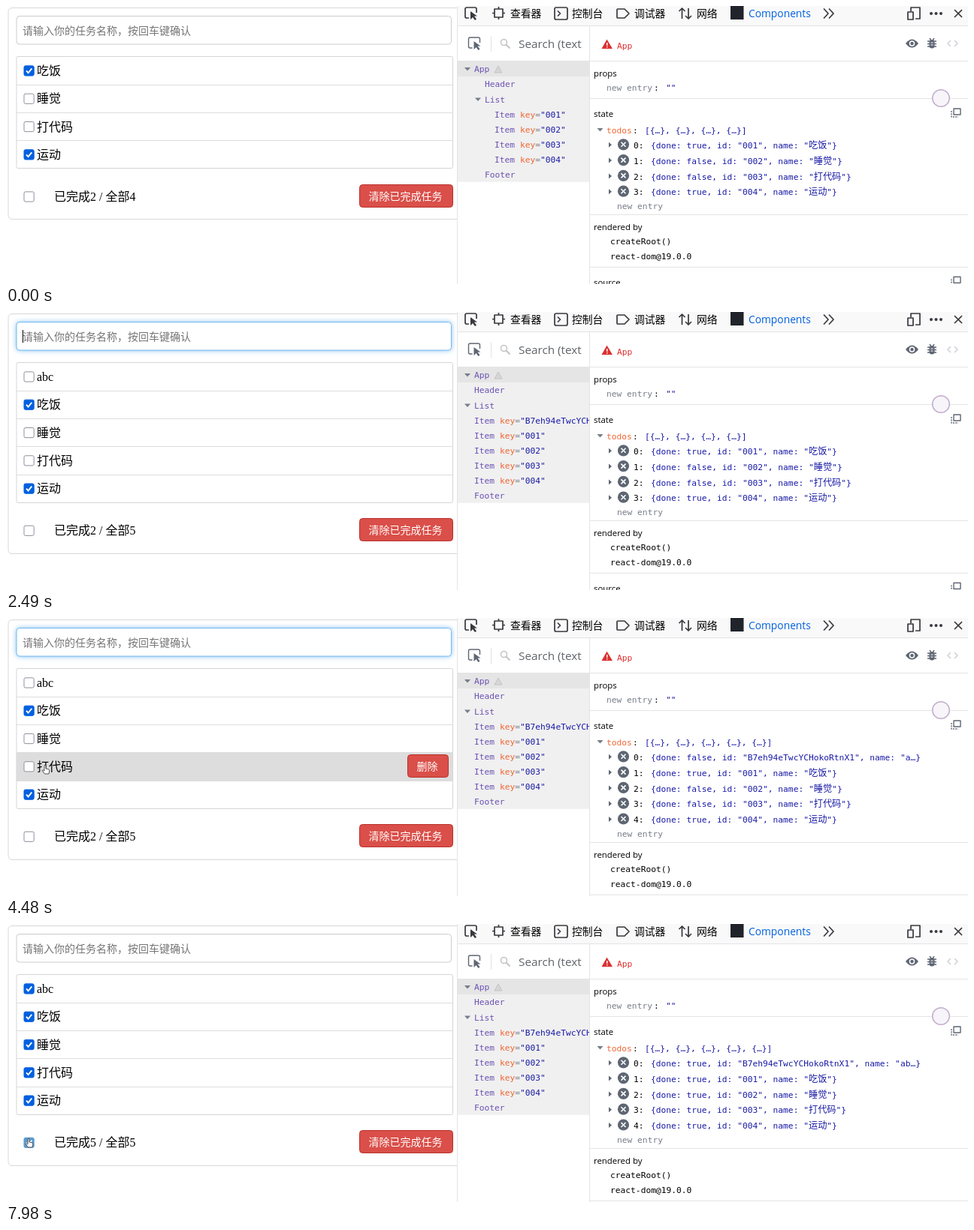
An HTML page for the animation above (8 s loop, 1280 by 371 pixels).

```html
<!DOCTYPE html>
<html lang="zh">
<head>
<meta charset="utf-8">
<style>
html, body { margin: 0; width: 100%; height: 100%; overflow: hidden; background: #fff; }
svg { display: block; width: 1280px; height: 371px; }
text { white-space: pre; }
.page { font: 300 16px "Liberation Serif", "Noto Sans CJK SC", serif; }
.field { font: 14px "Noto Sans", "Noto Sans CJK SC", sans-serif; }
.tab { font: 13.8px "Open Sans", "Noto Sans CJK SC", sans-serif; }
.search { font: 15.3px "Open Sans", sans-serif; fill: #5f6368; }
.label { font: 11.4px "Open Sans", sans-serif; }
.mono { font: 11.25px "DejaVu Sans Mono", "Noto Sans CJK SC", monospace; }
.cjk { font-size: 12.2px; font-weight: 300; }
.name { fill: #6a51b2; }
.attr { fill: #ef6632; }
.value { fill: #1a1aa6; }
.dim { fill: #777d88; }
.icon { fill: none; stroke: #38383d; stroke-width: 1.7; stroke-linejoin: round; }
.grey { stroke: #5f6673; stroke-width: 1.4; }
.rule { fill: none; stroke: #e4e4e6; }
.focus { filter: drop-shadow(0 0 3px rgba(82,168,236,.7)); }
</style>
</head>
<body>
<svg id="stage" viewBox="0 0 1280 371"></svg>
<script>
const LOOP = 8000, STEP = 80;
const ROW_TOP = 67.8, ROW = 37.3;
const NEW_ID = 'B7eh94eTwcYCHokoRtnX1';

// Pointer routes: [time, x, y]
const routes = [
  [[80, 1210, 362], [160, 938, 277], [240, 680, 175], [320, 470, 100], [400, 381, 77],
   [560, 335, 55], [800, 307, 33]],
  [[3180, 307, 33], [3260, 330, 50], [3420, 430, 108], [3500, 470, 130], [3580, 490, 148],
   [3740, 455, 272], [3820, 400, 262], [3900, 347, 250]],
  [[4000, 290, 236], [4240, 110, 206], [4400, 63, 197], [4480, 52, 196], [4640, 32, 195],
   [4880, 32, 194], [5040, 38, 172], [5280, 58, 225], [5520, 50, 256], [5640, 48, 258]],
  [[5720, 46, 263], [5800, 41, 273], [6040, 36, 279], [6360, 30, 286]]
];
const caretTimes = [[900, 1410], [1910, 2990], [3490, 3990], [4490, 4640]];

const within = (t, a, b) => t >= a && t < b;

function pointerAt(t) {
  if (t < 80 || within(t, 1140, 3180)) return null;
  const route = routes.filter(r => r[0][0] <= t).pop();
  const q = route[0][0] + Math.floor((t - route[0][0]) / STEP) * STEP;
  const next = route.findIndex(p => p[0] > q);
  if (next < 0) return route[route.length - 1].slice(1);
  const [t0, x0, y0] = route[next - 1], [t1, x1, y1] = route[next];
  const k = (q - t0) / (t1 - t0);
  return [x0 + (x1 - x0) * k, y0 + (y1 - y0) * k];
}

const text = (x, y, cls, str, fill) =>
  `<text x="${x}" y="${y}" class="${cls}"${fill ? ` fill="${fill}"` : ''}>${str}</text>`;
const span = (cls, str) => `<tspan class="${cls}">${str}</tspan>`;
const rect = (x, y, w, h, attrs) => `<rect x="${x}" y="${y}" width="${w}" height="${h}" ${attrs}/>`;
const path = (d, attrs) => `<path d="${d}" ${attrs}/>`;
const rule = d => path(d, 'class="rule"');
const icon = (d, cls = '') => path(d, `class="icon ${cls}"`);
const downArrow = (x, y) => path(`M${x - 4} ${y - 2}h8l-4 4.5z`, 'fill="#777d88"');
const rightArrow = (x, y) => path(`M${x - 1.5} ${y - 3.5}v7l4-3.5z`, 'fill="#5f6673"');

function checkbox(y, on, fill = '#0060df') {
  const box = rect(24, y - 6.6, 13.2, 13.2, `rx="2" fill="${on ? fill : '#fff'}" stroke="${on ? fill : '#8f8f9d'}"`);
  return box + (on ? path(`M27 ${y}l2.6 2.8 4.7-5.8`, 'fill="none" stroke="#fff" stroke-width="1.9"') : '');
}

function button(x, y, w, str) {
  return rect(x + .5, Math.round(y) - .5, w - 1, 30, 'rx="4" fill="#da4f49" stroke="#b8322b"') +
    text(x + 12.5, y + 20.3, 'field', str, '#fff');
}

function todosAt(t, addTime, toggleTime, allTime) {
  const all = t >= allTime;
  const todos = [
    { id: '001', name: '吃饭', done: true },
    { id: '002', name: '睡觉', done: all },
    { id: '003', name: '打代码', done: t >= toggleTime },
    { id: '004', name: '运动', done: true }
  ];
  return t < addTime ? todos : [{ id: NEW_ID, name: 'abc', done: all }, ...todos];
}

function field(t) {
  const focused = within(t, 900, 4640);
  const typed = within(t, 1140, 2490) ? 'abc'.slice(0, t < 1660 ? 1 : t < 1740 ? 2 : 3) : '';
  let out = rect(14, 13.5, 578.5, 37.5, `rx="4" fill="#fff" ${focused ? 'class="focus" stroke="#75b9f0"' : 'stroke="#ccc"'}`);
  out += typed ? text(22, 38, 'field', typed, '#333') : text(22, 38, 'field', '请输入你的任务名称，按回车键确认', '#757575');
  if (caretTimes.some(([a, b]) => within(t, a, b)))
    out += rect([22, 29, 36, 43][typed.length], 24, 1, 17, 'fill="#000"');
  return out;
}

function page(t) {
  const todos = todosAt(t, 2490, 4720, 7110), n = todos.length;
  const listHeight = Math.round(ROW * n), footer = ROW_TOP + ROW * n + 37.5;
  const lagging = pointerAt(t - STEP);
  const hovered = lagging && lagging[0] < 594 ? Math.floor((lagging[1] - ROW_TOP) / ROW) : -1;
  let out = rect(3, 2.5, 640, listHeight + 133, 'rx="5" fill="#fff" stroke="#d8d8d8"') + field(t);
  todos.forEach((todo, i) => {
    const top = ROW_TOP + ROW * i, mid = top + ROW / 2;
    if (i === hovered) out += rect(14, top, 580, ROW, 'fill="#ddd"') + button(534, mid - 15.2, 55, '删除');
    if (i) out += path(`M14 ${Math.floor(top) + .5}h580`, 'stroke="#ddd"');
    out += checkbox(mid, todo.done) + text(41, mid + 5.6, 'page', todo.name);
  });
  out += rect(14, 67.5, 580.5, listHeight, 'rx="2" fill="none" stroke="#d5d5d5"');
  const done = todos.filter(d => d.done).length;
  return out + checkbox(footer, done === n, '#5a9bcf') +
    text(64, footer + 5.4, 'page', `已完成${done} / 全部${n}`) +
    button(470, footer - 15.8, 125, '清除已完成任务');
}

function tree(t) {
  const added = t >= 2490;
  const ids = todosAt(t, 2490, LOOP, LOOP).map(d => d.id);
  const inset = added ? 623 : 637, itemX = added ? 623 : 650;
  const line = i => 88.3 + 20.1 * i;
  let out = rect(601, 94, 175, 20.1 * (ids.length + 3), 'fill="#f0f0f0"') + rect(601, 74, 175, 20, 'fill="#e5e5e5"');
  out += downArrow(614, 84) + downArrow(inset - 9, 124.5);
  out += path('M650 89l5-9 5 9z', 'fill="#d6d6d6" stroke="#c4c4c4"');
  out += text(623, line(0), 'mono name', 'App') + text(inset, line(1), 'mono name', 'Header') +
    text(inset, line(2), 'mono name', 'List');
  ids.forEach((id, i) => {
    out += text(itemX, line(3 + i), 'mono name',
      'Item ' + span('attr', 'key') + span('dim', '=') + span('value', `"${id}"`));
  });
  return `<g clip-path="url(#treeClip)">${out}${text(inset, line(3 + ids.length), 'mono name', 'Footer')}</g>`;
}

function preview({ id, name, done }) {
  const label = id === NEW_ID ? `"${name.slice(0, done ? 2 : 1)}…` : `"${span('cjk', name)}"`;
  return `{done: ${done}, id: "${id}", name: ${label}}`;
}

const copyIcon = y => icon(`M1261 ${y - 5}h9v8h-9z`, 'grey') +
  path(`M1258 ${y - 2}v8h9`, 'fill="none" stroke="#5f6673" stroke-width="1.4" stroke-dasharray="2 1.3"');

function inspector(t) {
  const todos = todosAt(t, 2660, 4880, 7620), n = todos.length;
  let out = text(782, 94, 'label', 'props') +
    text(799, 112.5, 'mono dim', 'new entry') + text(862, 112.5, 'mono', ':') + text(878, 112.5, 'mono value', '""') +
    rule('M777 123.5h503') + text(782, 147.5, 'label', 'state') + copyIcon(142) +
    downArrow(790.5, 165) + text(799, 170, 'mono attr', 'todos') + text(834, 170, 'mono', ':') +
    text(850, 170, 'mono value', `[${todos.map(() => '{…}').join(', ')}]`);
  todos.forEach((todo, i) => {
    const y = 185.3 + 20.8 * i;
    out += rightArrow(803.5, y) + `<circle cx="821.5" cy="${y - .5}" r="7.6" fill="#5f6673"/>` +
      path(`M818.5 ${y - 3.5}l6 6m0-6l-6 6`, 'stroke="#fff" stroke-width="1.6"') +
      text(835, y + 4.7, 'mono', i + ':') + text(858, y + 4.7, 'mono value', preview(todo));
  });
  const y = 278.5 + 21 * (n - 4);
  return out + text(813, y - 7.5, 'mono dim', 'new entry') + rule(`M777 ${y}h503`) +
    text(782, y + 20, 'label', 'rendered by') +
    text(804, y + 39.5, 'mono', 'createRoot()') + text(804, y + 59.7, 'mono', 'react-dom@19.0.0') +
    rule(`M777 ${y + 70}h503`) + text(782, y + 94, 'label', 'source') + copyIcon(y + 88);
}

function pointer(t) {
  const p = pointerAt(t);
  if (!p) return '';
  const [x, y] = p;
  let shape;
  if (x < 592 && y < 52) {
    shape = path('M-2.5-7h5M0-7v14M-2.5 7h5', 'fill="none" stroke="#333"');
  } else {
    const d = x < 95
      ? 'M-1 .8Q0-.5 1 .8V5L5 6Q6 6.5 5.8 8L5 12H-.5L-4 7.5Q-3.5 6-1 8Z'
      : 'M0 0V8.7L2 7 3.4 9.8 4.7 9.2 3.4 6.4H6Z';
    shape = path(d, 'fill="#fff" stroke="#444" stroke-width=".9"');
  }
  return `<g transform="translate(${x.toFixed(1)} ${y.toFixed(1)})">${shape}</g>`;
}

const pickIcon = (x, y, cls) => icon(`M${x + 7} ${y - 1}v-5q0-2-2-2h-11q-2 0-2 2v10q0 2 2 2h3`, cls) +
  path(`M${x - 1} ${y - 3}v11l3-3 3 4 2-1.5-3-4h4z`, `fill="${cls ? '#5f6673' : '#38383d'}"`);

const chrome = `<clipPath id="treeClip">${rect(601, 74, 175, 297, '')}</clipPath>` +
  rect(600, 0, 680, 371, 'fill="#fff"') + rect(600, 0, 680, 26, 'fill="#f9f9fa"') +
  rule('M600.5 0v371M600 26.5h680M600 73.5h680M776.5 27v344M645.5 40v21') +
  pickIcon(619, 10, '') +
  icon('M650 4h11v11h-11zM655.5 1v3m0 11v3M647 9.5h3m11 0h3') +
  icon('M732 2h13q2 0 2 2v12q0 2-2 2h-13q-2 0-2-2V4q0-2 2-2zM734 6.5l3.5 3.5-3.5 3.5') +
  icon('M814 4h9l6 6-6 6h-9q-1 0-1-1V5q0-1 1-1z') +
  icon('M899.5 17V3m-4 4l4-4 4 4M908 3v14m-4-4l4 4 4-4') +
  rect(964, 0, 17.5, 18, 'fill="#20232a"') +
  icon('M1088 3.5l6 6.5-6 6.5m7-13l6 6.5-6 6.5') +
  icon('M1204 7V2h12v15h-6M1200 8h7v10h-7z') +
  [1231, 1237.5, 1244].map(x => `<circle cx="${x}" cy="10" r="2" fill="#38383d"/>`).join('') +
  icon('M1262 5l10 10m0-10l-10 10') +
  text(671, 15, 'tab', '查看器') + text(753, 15, 'tab', '控制台') + text(836, 15, 'tab', '调试器') +
  text(919, 15, 'tab', '网络') + text(988, 15, 'tab', 'Components', '#0060df') +
  pickIcon(623.5, 50, 'grey') +
  '<circle cx="662.5" cy="48.5" r="4" fill="none" stroke="#c5c5c5" stroke-width="1.6"/>' +
  path('M665.5 51.5l5 5', 'stroke="#c5c5c5" stroke-width="2"') +
  text(682, 56, 'search', 'Search (text') +
  path('M792.5 57l7-12.5 7.5 12.5z', 'fill="#dc3030"') + path('M799.8 49v4m0 1v1.5', 'stroke="#fff" stroke-width="1.4"') +
  text(813, 57, 'mono', 'App', '#e02a2a') +
  path('M1197 50q8.5-11 17 0q-8.5 11-17 0z', 'fill="#5f6673"') +
  '<circle cx="1205.5" cy="50" r="3" fill="#5f6673" stroke="#fff" stroke-width="1.5"/>' +
  rect(1228.5, 45, 7, 11.5, 'rx="3.5" fill="#5f6673"') +
  path('M1226 47h12m-12 3.5h12m-12 3.5h12M1229 43l2 3m4-3l-2 3', 'stroke="#5f6673" stroke-width="1.5"') +
  path('M1230.5 49h3m-3 3h3', 'stroke="#fff"') +
  path('M1257 46l-4 4 4 4m5-8l4 4-4 4', 'fill="none" stroke="#cfd1d5" stroke-width="1.5"');

const badge = '<circle cx="1244" cy="123" r="11.3" fill="#f7f4fa" stroke="#c3aecb" stroke-width="1.5"/>';

const stage = document.getElementById('stage');
let shown = '';
function draw() {
  const t = performance.now() % LOOP;
  const scene = page(t) + chrome + tree(t) + inspector(t) + badge + pointer(t);
  if (scene !== shown) stage.innerHTML = shown = scene;
  requestAnimationFrame(draw);
}
draw();
</script>
</body>
</html>
```
